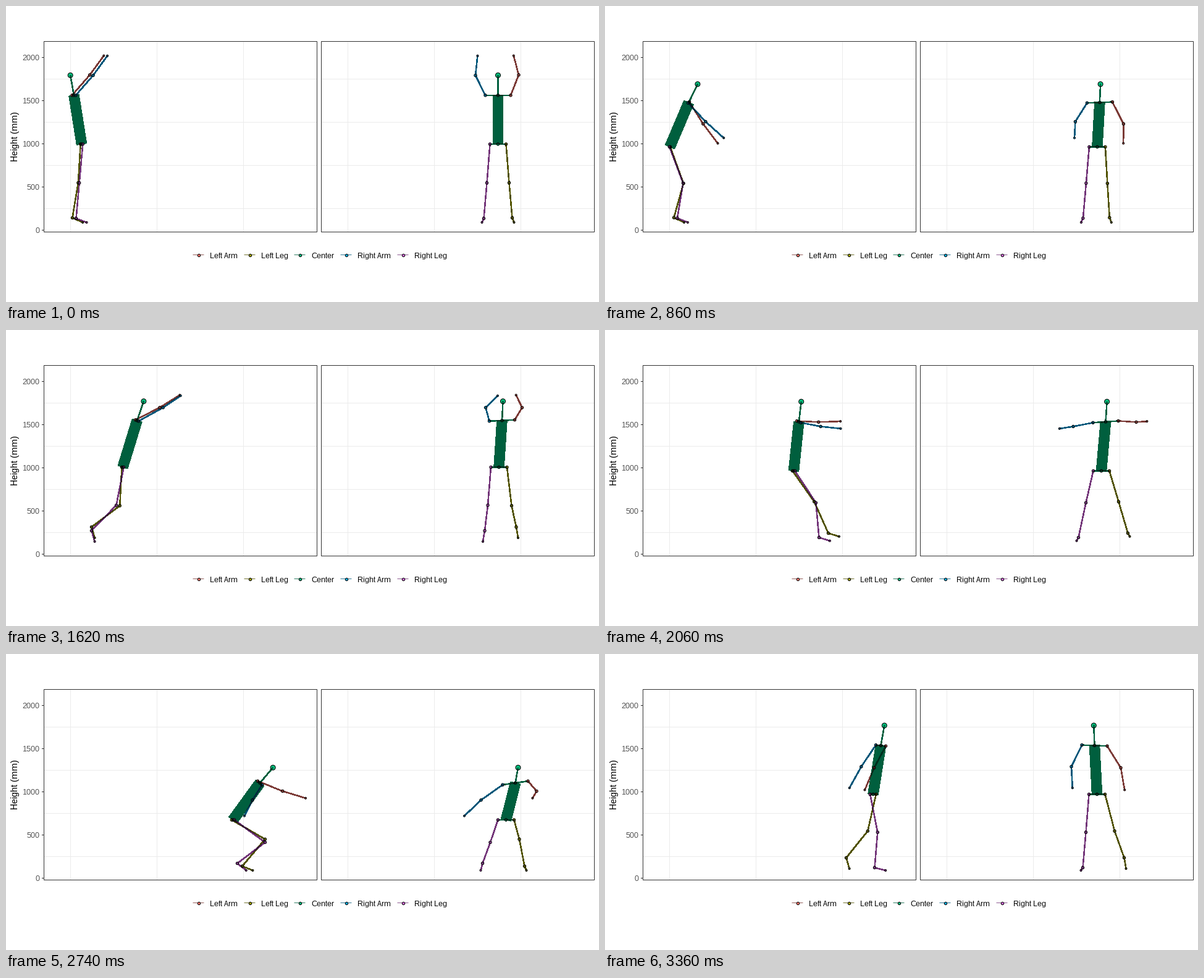
Animation, 960 px wide and 480 px high, one loop 3.38 s. Source, as a matplotlib script:

```python
import numpy as np
import matplotlib.pyplot as plt
from matplotlib.animation import FuncAnimation
from matplotlib.colors import to_rgb
from matplotlib.patches import Rectangle

W, H, DPI = 960, 480, 100
STEP, FRAMES = 20, 169
PX = 72 / DPI  # points per pixel
TIMES = np.arange(FRAMES) * STEP
GROUND = 351
TRUNK, HEAD, UPPER, FORE, THIGH, SHANK, FOOT = 80.5, 33, 45.6, 39.5, 63, 57.8, 18.5
SHOULDER, PELVIS = 20.5, 13  # half widths

plt.rcParams.update({"font.family": "Liberation Sans", "path.snap": False,
                     "text.hinting": "native", "text.hinting_factor": 1})

COLORS = {"Left Arm": "#F8766D", "Left Leg": "#A3A500", "Center": "#00BF7D",
          "Right Arm": "#00B0F6", "Right Leg": "#E76BF3"}
ARM = ["shoulder", "elbow", "wrist"]
LEG = ["thigh", "knee", "ankle", "toe"]
GROUPS = {"Left Arm": ["L" + j for j in ARM], "Left Leg": ["L" + j for j in LEG],
          "Center": ["head", "neck", "hip"],
          "Right Arm": ["R" + j for j in ARM], "Right Leg": ["R" + j for j in LEG]}
JOINTS = [j for group in GROUPS.values() for j in group]


def track(keys):
    """Monotone cubic through {ms: value}, sampled at every frame."""
    t, v = np.array(list(keys.items()), float).T
    slope = np.diff(v) / np.diff(t)
    m = np.gradient(v, t)
    a, b = slope[:-1], slope[1:]
    cap = 3 * np.minimum(abs(a), abs(b))
    m[1:-1] = np.where(a * b > 0, np.clip(m[1:-1], -cap, cap), 0)
    i = np.clip(np.searchsorted(t, TIMES, "right") - 1, 0, len(t) - 2)
    h = t[i + 1] - t[i]
    u = (TIMES - t[i]) / h
    return ((1 + 2 * u) * (1 - u) ** 2 * v[i] + u * (1 - u) ** 2 * h * m[i]
            + u * u * (3 - 2 * u) * v[i + 1] + u * u * (u - 1) * h * m[i + 1])


def ramp(start, end):
    u = np.clip((TIMES - start) / (end - start), 0, 1)
    return u * u * (3 - 2 * u)


def point(x, front, y):
    return np.stack(np.broadcast_arrays(x, front, y), 1).astype(float)


def bone(start, size, angle, out=0.0):
    """Rigid bone: side-view angle in degrees (0 forward, 90 down), sideways part out."""
    reach = np.sqrt(np.maximum(size ** 2 - np.square(out), 0))
    a = np.radians(angle)
    return start + point(reach * np.cos(a), out, reach * np.sin(a))


def knee(hip, ankle):
    """Two-bone bend: the knee lies in front of the line from ankle to hip."""
    front = (hip[:, 1] + ankle[:, 1]) / 2
    out = (hip[:, 1] - ankle[:, 1]) / 2
    d = (hip - ankle)[:, [0, 2]]
    dist = np.hypot(*d.T)
    dx, dy = d.T / dist
    along = (SHANK ** 2 - THIGH ** 2 + dist ** 2) / (2 * dist)
    bend = np.sqrt(np.maximum(SHANK ** 2 - out ** 2 - along ** 2, 0))
    return point(ankle[:, 0] + along * dx - bend * dy, front,
                 ankle[:, 2] + along * dy + bend * dx)


# Trunk: crouch, jump, land in a crouch, stand up
hip = point(
    track({0: 122.5, 860: 105, 1080: 106, 1360: 128, 1560: 171, 1620: 189,
           2060: 305.5, 2160: 331, 2260: 347, 2600: 360, 2740: 367.5, 3040: 405, 3360: 434}),
    track({0: 796.5, 1620: 798, 2060: 803.5, 2740: 809.5, 3360: 796.5}),
    track({0: 224, 860: 228.5, 1080: 243, 1360: 256.5, 1480: 252, 1620: 222.5, 1840: 192,
           2060: 228.5, 2160: 263, 2300: 283, 2600: 280, 2740: 269, 3040: 236, 3360: 227.5}))
pitch = track({0: -99, 540: -93, 860: -67, 1080: -51, 1360: -42, 1620: -73, 2060: -84,
               2420: -55, 2740: -54, 3000: -68, 3360: -81})
lean = track({0: 0, 860: 4, 1620: 5, 2060: 7, 2740: 15, 3360: -4})
twist = track({0: -3, 860: 1, 1620: -2.5, 2740: -3.5, 3360: 8})
spine = TRUNK - 26 * (1 + np.sin(np.radians(pitch)))
neck = bone(hip, spine, pitch, lean)
body = {"hip": hip, "neck": neck,
        "head": bone(neck, HEAD, -90 + 1.12 * (pitch + 90), 0.3 * lean)}

# Arms: raised, swung back, thrown forward, lowered; the right one drops first on landing
swing = track({0: -49, 300: -58, 540: -60, 860: 58, 1080: 165, 1360: 135, 1480: 60,
               1620: -27, 1740: -35, 2060: 3, 2740: 22, 3360: 118})
lead = track({0: 0, 860: -11, 1360: 12, 1620: -2, 2060: 8, 2740: 100, 3360: 6})
splay = {"L": track({0: 13, 860: 18, 1360: 22, 1620: 12, 2060: 29, 2740: 14, 3360: 22}),
         "R": track({0: 16, 860: 19, 1360: 20, 1620: 6, 2060: 32, 2740: 35, 3360: 17})}

# Legs: the right ankle follows the left one until it steps forward
ankle_x = track({0: 107.5, 860: 111.5, 1360: 121.5, 1500: 124, 1620: 138.5, 1830: 222,
                 2060: 361.5, 2140: 381, 3240: 384, 3360: 390.5})
ankle_y = track({0: 343.5, 1500: 342.5, 1620: 319.5, 1830: 291, 2060: 329.5, 2140: 344,
                 3100: 344, 3360: 330.5})
right_dx = track({0: 6, 1360: 4.5, 1620: 0, 2060: -15, 2140: -7, 2740: -8, 3180: 53, 3360: 46})
right_y = track({0: 344.5, 1500: 343, 1620: 325.5, 1830: 294, 2060: 336.5, 2140: 344,
                 2600: 344, 2740: 339.5, 3040: 328, 3180: 346, 3360: 346.5})
stance = {"L": track({0: 23, 1360: 19, 1620: 28, 2060: 43, 2740: 30, 3360: 44}),
          "R": track({0: 23, 1620: 23, 2060: 37, 2740: 38, 3360: 23})}
toes_up = ramp(1830, 2050) * (1 - ramp(2080, 2140))

for s, sign in (("L", 1), ("R", -1)):
    is_right = s == "R"
    arm = swing + lead * is_right
    shoulder = neck + sign * point(twist, SHOULDER, -0.2 * lean)
    elbow = bone(shoulder, UPPER, arm, sign * splay[s])
    wrist = bone(elbow, FORE, arm - 5, sign * (1.6 * splay[s] - 29))
    thigh = hip + sign * point(0.6 * twist, PELVIS, 0)
    ankle = point(ankle_x + right_dx * is_right, hip[:, 1] + sign * stance[s],
                  right_y if is_right else ankle_y)
    # A raised heel keeps its toe on the ground until the foot hangs
    tilt = np.degrees(np.arcsin(np.clip((GROUND - ankle[:, 2]) / FOOT, 0, 0.96)))
    toe = bone(ankle, FOOT, tilt + (17 - tilt) * toes_up, sign * 3)
    body.update(zip([s + j for j in ARM + LEG],
                    [shoulder, elbow, wrist, thigh, knee(thigh, ankle), ankle, toe]))

fig = plt.figure(figsize=(W / DPI, H / DPI), dpi=DPI, facecolor="white")
ax = fig.add_axes([0, 0, 1, 1])
ax.set(xlim=(0, W), ylim=(H, 0))
ax.axis("off")


def line(xs, ys, color, width=1, z=1, **kw):
    return ax.plot(xs, ys, color=color, lw=width * PX, zorder=z,
                   solid_capstyle="butt", **kw)[0]


def label(x, y, text, size=12, color="black", **kw):
    ax.text(x, y, text, fontsize=size * PX, color=color, **kw)


def dots(xy, diameters, fills, z):
    return ax.scatter(*np.transpose(xy), s=(np.array(diameters) * PX) ** 2, c=fills,
                      edgecolors="black", linewidths=PX, zorder=z)


for left in (61.5, 510.5):
    for y in np.arange(4) * 70 + 118.5:
        line([left, left + 442], [y, y], "#EBEBEB")
    for x in left + np.array([43, 183, 323]):
        line([x, x], [57.5, 366.5], "#EBEBEB")
    ax.add_patch(Rectangle((left, 57.5), 442, 309, fill=False, ec="#333333", lw=PX, zorder=9))
for n in range(5):
    y = 363.5 - 70 * n
    line([58, 61], [y, y], "#333333")
    label(54.5, y + 5, str(500 * n), color="#4D4D4D", ha="right", va="baseline")
label(15.5, 211.5, "Height (mm)", 15, rotation=90, ha="center", va="center")

for (name, color), x in zip(COLORS.items(), (311.5, 394.5, 475.5, 550.5, 642.5)):
    line([x - 9, x + 9], [403.5, 403.5], np.array(to_rgb(color)) / 2, alpha=0.8)
    dots([(x, 403.5)], [4.4], [color], 2)
    label(x + 18.5, 409, name, va="baseline")

CENTER = [(["hip", "neck"], 16.5), (["neck", "head"], 1.5),
          (["Lshoulder", "neck", "Rshoulder"], 1.5), (["Lthigh", "hip", "Rthigh"], 1.5)]
PATHS = [(path, width, COLORS[name]) for name, joints in GROUPS.items()
         for path, width in (CENTER if name == "Center" else [(joints, 1.5)])]
SIZES = [8 if j == "head" else 3 if j[1:] in ("wrist", "toe") else 4.4 for j in JOINTS]
FILLS = [COLORS[name] for name, joints in GROUPS.items() for _ in joints]


class View:
    """One panel: coloured paths, dots, then a half-black copy of the paths."""

    def __init__(self, axis):
        self.at = {j: p[:, [axis, 2]] for j, p in body.items()}
        self.lines = []
        for path, width, color in PATHS:
            for c, alpha, z in ((color, 1, 4), ("black", 0.5, 6)):
                art = line([], [], c, width, z, alpha=alpha, antialiased=False)
                self.lines.append((path, art))
        self.dots = dots([self.at[j][0] for j in JOINTS], SIZES, FILLS, 5)

    def move(self, i):
        for path, art in self.lines:
            art.set_data(*np.transpose([self.at[j][i] for j in path]))
        self.dots.set_offsets([self.at[j][i] for j in JOINTS])


views = [View(0), View(1)]


def draw(i):
    for view in views:
        view.move(i)
    return []


anim = FuncAnimation(fig, draw, frames=FRAMES, interval=STEP, repeat=True, blit=False)
plt.show()
```
